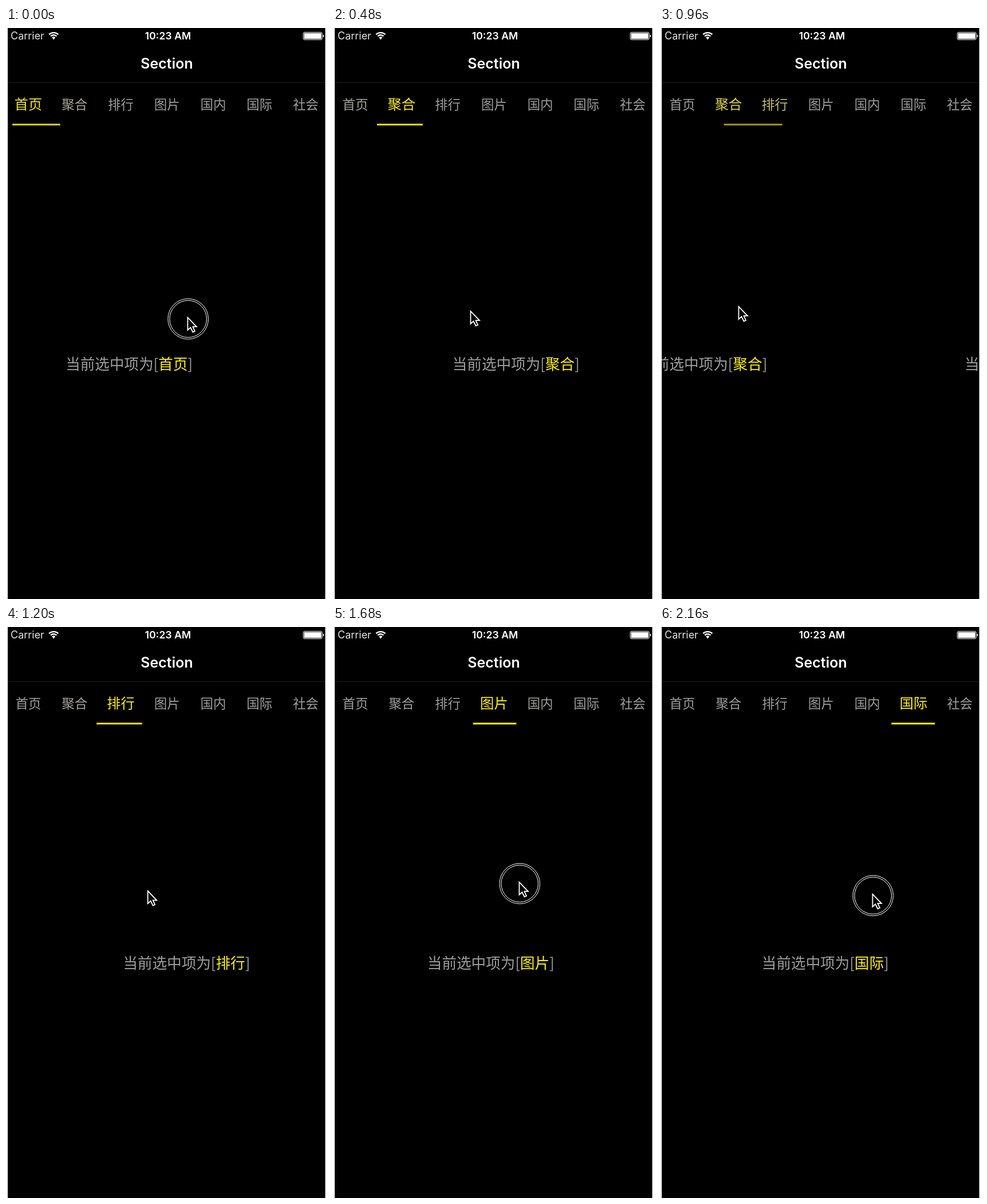
Write an HTML page with a canvas that moves like this. It is 561 px wide and 998 px high and loops after 2.22 s.

```html
<!DOCTYPE html>
<html lang="zh-CN">
<head>
<meta charset="utf-8">
<title>Section</title>
<style>
html, body { margin: 0; width: 100%; height: 100%; overflow: hidden; background: #fff; }
canvas { display: block; }
</style>
</head>
<body>
<canvas id="stage" width="561" height="998"></canvas>
<script>
const ctx = document.getElementById('stage').getContext('2d');
const LOOP = 2220, STEP = 60;
const CJK = '"Noto Sans CJK SC", "Noto Sans CJK", sans-serif';
const LATIN = 'Inter, Roboto, sans-serif';
const tabs = ['首页', '聚合', '排行', '图片', '国内', '国际', '社会'];
const GRAY = [158, 158, 158], YELLOW = [255, 240, 22];

// [step, page position]
const pages = [[0, .117], [1, .226], [2, .314], [3, .365], [5, .653], [7, .88], [9, .985], [11, 1],
  [12, 1.071], [13, 1.17], [14, 1.277], [15, 1.34], [16, 1.362], [18, 1.68], [20, 1.94], [22, 2.02],
  [24, 2.288], [26, 2.75], [28, 3.01], [30, 3.42], [31, 3.85], [32, 4.0185], [33, 4.1], [34, 4.42],
  [35, 4.83], [36, 4.987]];
// [step, x, y] of the pointer tip
const pointer = [[0, 317, 506], [1, 255, 505], [2, 205, 504], [3, 178, 504], [5, 172, 504], [8, 240, 495],
  [11, 352, 486], [12, 312, 486], [14, 195, 487], [16, 137, 487], [19, 210, 468], [22, 322, 448],
  [24, 167, 447], [25, 135, 447], [28, 325, 446], [30, 120, 445], [31, 165, 445], [32, 278, 445],
  [33, 335, 450], [34, 155, 456], [35, 240, 462], [36, 371, 467]];
const presses = [[0, 3], [11, 15], [22, 24], [28, 30], [33, 34], [36, 36]];

function track(keys, at, field) {
  const i = Math.max(1, keys.findIndex(k => k[0] >= at));
  const a = keys[i - 1], b = keys[i];
  return a[field] + (b[field] - a[field]) * (at - a[0]) / (b[0] - a[0]);
}

function text(str, x, y, font, color, align = 'left') {
  ctx.font = font;
  ctx.fillStyle = color;
  ctx.textAlign = align;
  ctx.fillText(str, x, y);
  return ctx.measureText(str).width;
}

const rgb = c => `rgb(${c.map(Math.round)})`;
const mix = k => rgb(GRAY.map((g, i) => g + (YELLOW[i] - g) * k));

function circle(x, y, r) {
  ctx.beginPath();
  ctx.arc(x, y, r, 0, 2 * Math.PI);
  ctx.stroke();
}

function drawBars() {
  text('Carrier', 8, 20, `18px ${LATIN}`, '#e4e4e4');
  text('10:23 AM', 283, 20, `600 17.7px ${LATIN}`, '#fff', 'center');
  text('Section', 281, 71, `600 25px ${LATIN}`, '#fff', 'center');

  ctx.strokeStyle = ctx.fillStyle = '#fff';
  ctx.lineWidth = 2.4;
  for (const r of [7.3, 11.4]) {
    ctx.beginPath();
    ctx.arc(83.3, 19.5, r, -Math.PI * .75, -Math.PI * .25);
    ctx.stroke();
  }
  ctx.beginPath();
  ctx.moveTo(83.3, 20.5);
  ctx.arc(83.3, 19.5, 4.2, -Math.PI * .75, -Math.PI * .25);
  ctx.fill();

  ctx.lineWidth = 1;
  ctx.beginPath();
  ctx.roundRect(519.5, 7.5, 33, 13, 2.5);
  ctx.stroke();
  ctx.fillRect(521, 9, 30, 10);
  ctx.fillRect(554, 12, 1.6, 4);

  ctx.fillStyle = '#1c1c1c';
  ctx.fillRect(3, 95, 555, 1);
}

function drawTabs(page) {
  tabs.forEach((name, i) => {
    const k = Math.max(0, 1 - Math.abs(page - i));
    const size = 22.4 * (1 + .09 * k);
    text(name, 39 + 80.8 * i, 133 + .38 * size, `300 ${size}px ${CJK}`, mix(k), 'center');
  });
  const off = Math.abs(page - Math.round(page));
  ctx.fillStyle = rgb(YELLOW.map(c => c * (1 - off)));
  ctx.fillRect(1.5 + 80.8 * page, 167.3, 75 * (1 + off), 3);
}

function drawPages(page) {
  const font = `300 25.6px ${CJK}`;
  tabs.forEach((name, i) => {
    let x = 170.5 + (i - page) * 567;
    if (x < -240 || x > 570) return;
    x += text('当前选中项为[', x, 597, font, rgb(GRAY));
    x += text(name, x, 597, font, rgb(YELLOW));
    text(']', x, 597, font, rgb(GRAY));
  });
}

function drawPointer(x, y, pressed) {
  ctx.strokeStyle = '#fff';
  if (pressed) {
    ctx.lineWidth = 1;
    circle(x + 1.3, y + 2.5, 35.3);
    circle(x + 1.3, y + 2.5, 32.3);
  }
  ctx.save();
  ctx.translate(x + .5, y);
  ctx.lineWidth = 1.8;
  ctx.fillStyle = '#000';
  ctx.fill(arrow);
  ctx.stroke(arrow);
  ctx.restore();
}
const arrow = new Path2D('M0 0V22L5 17.5L9 25.5L12.5 24L9 16.2H15.5Z');

function draw(now) {
  const at = Math.floor(now % LOOP / STEP);
  const page = track(pages, at, 1);
  ctx.fillStyle = '#fff';
  ctx.fillRect(0, 0, 561, 998);
  ctx.save();
  ctx.beginPath();
  ctx.rect(3, 0, 555, 998);
  ctx.clip();
  ctx.fillStyle = '#000';
  ctx.fillRect(3, 0, 555, 998);
  drawBars();
  drawTabs(page);
  drawPages(page);
  drawPointer(track(pointer, at, 1), track(pointer, at, 2), presses.some(([a, b]) => at >= a && at <= b));
  ctx.restore();
}

const start = performance.now();
function tick() {
  draw(performance.now() - start);
  requestAnimationFrame(tick);
}
tick();
</script>
</body>
</html>
```
